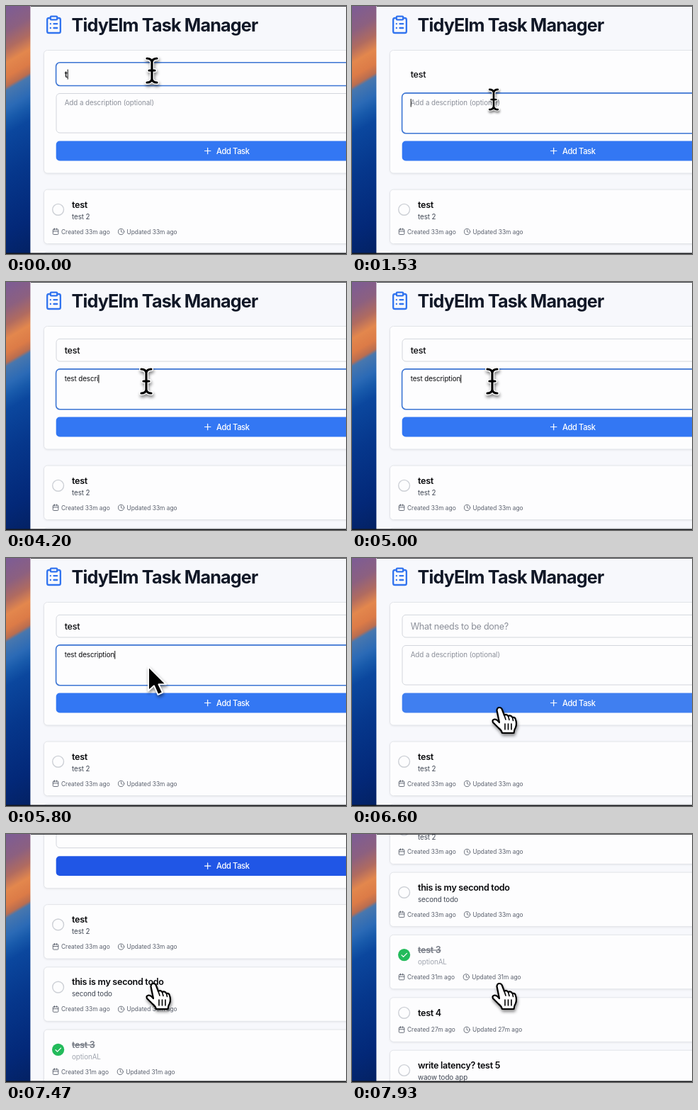
Animation of 480 by 350 pixels, one loop 8000 ms. Source, as an HTML page:

```html
<!DOCTYPE html>
<html lang="en">
<head>
<meta charset="utf-8">
<title>Task list</title>
<style>
  html, body { margin: 0; width: 100%; height: 100%; overflow: hidden; background: #f7f8fc; }
  svg { display: block; }
  text { font-family: Inter, "Open Sans", sans-serif; font-optical-sizing: none; white-space: pre; fill: #08090c; }
  .title { font-size: 25.2px; font-weight: 700; letter-spacing: -.85px; fill: #111827; }
  .large { font-size: 12.6px; font-weight: 500; letter-spacing: -.3px; }
  .strong { font-weight: 600; }
  .small { font-size: 9.8px; letter-spacing: -.08px; }
  .meta { font-size: 8.4px; fill: #5a606d; }
  .button { font-size: 11.2px; font-weight: 500; letter-spacing: -.4px; fill: #fff; }
  .hint { fill: #8b8f99; font-weight: 400; }
  .note { fill: #3f4653; }
  .done { fill: #777c86; text-decoration: line-through; }
  .faded { fill: #a1a6b0; }
  .card { fill: #fdfdfe; stroke: #e2e4e9; filter: drop-shadow(0 1px 1px #00000010); }
  .field { fill: #fdfdfe; stroke: #d3d6dc; }
  .ring { fill: none; stroke: #3b74d3; stroke-width: 1.6; }
  .line { fill: none; stroke-linecap: round; stroke-linejoin: round; }
  #cursor { filter: drop-shadow(1px 3px 2px #0007); }
</style>
</head>
<body>
<svg width="480" height="350" viewBox="0 0 480 350">
  <defs>
    <linearGradient id="sky" gradientUnits="userSpaceOnUse" x1="0" y1="0" x2="175" y2="300">
      <stop offset="0" stop-color="#7c5c96"/>
      <stop offset=".09" stop-color="#8c6080"/>
      <stop offset=".15" stop-color="#b06b60"/>
      <stop offset=".2" stop-color="#e3874d"/>
      <stop offset=".25" stop-color="#dc7b47"/>
      <stop offset=".283" stop-color="#b96d50"/>
      <stop offset=".297" stop-color="#4877ae"/>
      <stop offset=".36" stop-color="#2b6ab6"/>
      <stop offset=".4" stop-color="#185aab"/>
      <stop offset=".45" stop-color="#0b479e"/>
      <stop offset=".6" stop-color="#06378c"/>
      <stop offset=".8" stop-color="#032878"/>
      <stop offset="1" stop-color="#041d55"/>
    </linearGradient>
    <clipPath id="window"><path d="M34.4 0H480V350H34.4z"/></clipPath>
    <path id="beamShape" d="M-7-17Q-1-17 0-12Q1-17 7-17M0-12V12M-7 17Q-1 17 0 12Q1 17 7 17M-4 0H4"/>
  </defs>

  <path fill="url(#sky)" d="M0 0H36V350H0z"/>
  <path fill="#f7f8fc" d="M34.4 0H480V350H34.4z"/>

  <g clip-path="url(#window)">
    <g id="page">
      <g class="line" stroke="#3274ef" stroke-width="2" transform="translate(53.5 12.3) scale(1.167)">
        <rect x="8" y="2" width="8" height="4" rx="1"/>
        <path d="M16 4h2a2 2 0 0 1 2 2v14a2 2 0 0 1-2 2H6a2 2 0 0 1-2-2V6a2 2 0 0 1 2-2h2M12 11h4M12 16h4M8 11h.01M8 16h.01"/>
      </g>
      <text class="title" x="92.5" y="35.6">TidyElm Task Manager</text>

      <rect class="card" x="53.5" y="62.5" width="515" height="173.5" rx="5"/>
      <rect class="field" id="nameBox" x="71" y="80.3" width="480" height="31.7" rx="5"/>
      <rect class="ring" id="nameRing" x="70.6" y="79.7" width="481" height="32.8" rx="5.5"/>
      <text class="large" id="name" x="82.7" y="100.8"></text>
      <rect class="field" id="noteBox" x="71" y="123.5" width="480" height="55.5" rx="5"/>
      <rect class="ring" id="noteRing" x="70.6" y="122.9" width="481" height="56.9" rx="5.5"/>
      <text class="small" id="note" x="82.7" y="140"></text>
      <rect id="caret" width="1" fill="#111"/>

      <rect id="add" x="70.7" y="190.6" width="480.6" height="27.8" rx="5"/>
      <path class="line" stroke="#fff" stroke-width="1.2" d="M280.5 204.5h8.4M284.7 200.3v8.4"/>
      <text class="button" x="297" y="208.6">Add Task</text>
      <g id="list"></g>
    </g>
  </g>

  <path fill="#16181c" d="M35 0H480V.8H35zM0 348.6H480V350H0z"/>

  <g id="cursor">
    <g id="beam" class="line">
      <use href="#beamShape" stroke="#fff" stroke-width="6"/>
      <use href="#beamShape" stroke="#000" stroke-width="3.2"/>
    </g>
    <path id="arrow" fill="#000" stroke="#fff" stroke-width="2" stroke-linejoin="round"
      d="M0 0V34L8 27L13.5 39.5L20 36.5L14.5 25H25z"/>
    <g id="hand" class="line" stroke="#000" stroke-width="2.2">
      <path fill="#fff" d="M-3.5 3Q-3-1 0-1Q3-1 4 2L7 10Q10 8 12.5 11Q16 9 18.5 13Q22 12 23 16Q25 22 23 27Q21 30 20.5 35H4Q3 31-1 28L-9 20Q-10.500 16-6.500 15.500Q-3 16 0 20z"/>
      <path stroke-width="1.6" d="M7 10L9 16M12.5 11L14 16.5M18.5 13L19.5 17.5M8 22V30M12.5 22V30M17 22V30"/>
    </g>
  </g>
</svg>

<script>
const DURATION = 8000;
const el = id => document.getElementById(id);

const tasks = [
  { y: 259, title: 'test', note: 'test 2', age: 33, clock: 158 },
  { y: 347.2, title: 'this is my second todo', note: 'second todo', age: 33, clock: 158 },
  { y: 435.4, title: 'test 3', note: 'optionAL', age: 31, clock: 156.7, done: true },
  { y: 523.9, title: 'test 4', age: 27, clock: 157.5 },
  { y: 598.3, title: 'write latency? test 5', note: 'waow todo app', age: 25, clock: 157.5 },
];

function taskCard({ y, title, note, age, clock, done }) {
  const height = note ? 76.5 : 62.5;
  const circleY = note ? 28.3 : 21.5;
  const metaY = height - 17;
  const mark = done
    ? `<circle cx="73.6" cy="${circleY}" r="8.6" fill="#23bb5b"/>
       <path class="line" stroke="#fff" stroke-width="1.3" d="M70 ${circleY + .3}l2.5 2.5 5-5"/>`
    : `<circle cx="73.6" cy="${circleY}" r="7.9" fill="none" stroke="#cdd0d6" stroke-width="1.4"/>`;
  return `<g transform="translate(0 ${y})">
    <rect class="card" x="53.5" width="515" height="${height}" rx="5"/>
    ${mark}
    <text class="large strong ${done ? 'done' : ''}" x="93" y="25.7">${title}</text>
    ${note ? `<text class="small ${done ? 'faded' : 'note'}" x="93" y="41.6">${note}</text>` : ''}
    <g class="line" stroke="#5a606d" stroke-width=".9" transform="translate(0 ${metaY})">
      <rect x="66.3" y="-3.5" width="7.5" height="7.5" rx="1"/>
      <path d="M66.3-.6h7.5M68.5-4.6v2M71.6-4.6v2"/>
      <circle cx="${clock + 4.6}" r="4.1"/>
      <path d="M${clock + 4.6}-2.5v2.5l1.7.9"/>
    </g>
    <text class="meta" x="78" y="${metaY + 3}">Created ${age}m ago</text>
    <text class="meta" x="${clock + 12.5}" y="${metaY + 3}">Updated ${age}m ago</text>
  </g>`;
}
el('list').innerHTML = tasks.map(taskCard).join('');

// Rows are [time, ...values], interpolated linearly.
const pointer = [
  [950, 206, 91], [1080, 205, 97], [1280, 201, 126], [1400, 200, 132],
  [1580, 200, 132], [1760, 198, 140], [5620, 198, 140], [5720, 199, 145],
  [5800, 201, 153], [5900, 204, 182], [6000, 207, 205], [6090, 208, 212],
];
const scroll = [
  [7060, 0], [7130, 13], [7200, 38], [7330, 95], [7470, 159],
  [7600, 211], [7730, 252], [7840, 278], [7930, 293], [8000, 299],
];
const buttonColor = [
  [5970, 51, 119, 243], [6100, 32, 86, 230], [6400, 32, 86, 230],
  [6520, 64, 127, 240], [6700, 64, 127, 240], [6810, 32, 86, 230],
];
const FOCUS_NOTE = 1500, BLUR = 6300, CLEAR = 6400;
const press = [FOCUS_NOTE, BLUR].flatMap(t => [[t - 80, 1], [t, .83], [t + 50, .83], [t + 170, 1]]);
const nameKeys = [0, 150, 290, 420];
const noteKeys = Array.from('test description', (_, i) => 2720 + i * 135);

function sample(rows, t) {
  const next = rows.findIndex(row => row[0] > t);
  if (next === 0) return rows[0].slice(1);
  if (next < 0) return rows.at(-1).slice(1);
  const a = rows[next - 1], b = rows[next];
  const k = (t - a[0]) / (b[0] - a[0]);
  return a.slice(1).map((v, i) => v + (b[i + 1] - v) * k);
}
const show = (id, on) => { el(id).style.display = on ? '' : 'none'; };

function fill(id, value, placeholder) {
  el(id).textContent = value || placeholder;
  el(id).classList.toggle('hint', !value);
}

function placeCaret(t, id, value, keys, start, top, height) {
  const last = Math.max(start, ...keys.filter(key => key <= t));
  const width = value ? el(id).getComputedTextLength() : 0;
  const caret = el('caret');
  caret.setAttribute('x', 82.7 + width);
  caret.setAttribute('y', top);
  caret.setAttribute('height', height);
  show('caret', t < BLUR && (t - last) % 1000 < 500);
}

function render(t) {
  const typed = (text, keys) => t < CLEAR ? text.slice(0, keys.filter(key => key <= t).length) : '';
  const name = typed('test', nameKeys);
  const note = typed('test description', noteKeys);
  fill('name', name, 'What needs to be done?');
  fill('note', note, 'Add a description (optional)');

  const onName = t < FOCUS_NOTE;
  const onNote = !onName && t < BLUR;
  show('nameRing', onName);
  show('noteRing', onNote);
  el('nameBox').style.strokeOpacity = sample([[1540, 0], [1650, 1]], t)[0];
  el('noteBox').style.strokeOpacity = onNote ? 0 : 1;
  if (onName) placeCaret(t, 'name', name, nameKeys, 0, 89.5, 14);
  else placeCaret(t, 'note', note, noteKeys, FOCUS_NOTE, 131, 11.5);

  el('add').style.fill = `rgb(${sample(buttonColor, t)})`;
  el('page').setAttribute('transform', `translate(0 ${-sample(scroll, t)[0]})`);

  el('cursor').setAttribute('transform', `translate(${sample(pointer, t)}) scale(${sample(press, t)})`);
  show('beam', t < 5740);
  show('arrow', t >= 5740 && t < 5960);
  show('hand', t >= 5960);
}

function tick() {
  render(performance.now() % DURATION);
  requestAnimationFrame(tick);
}
tick();
</script>
</body>
</html>
```
